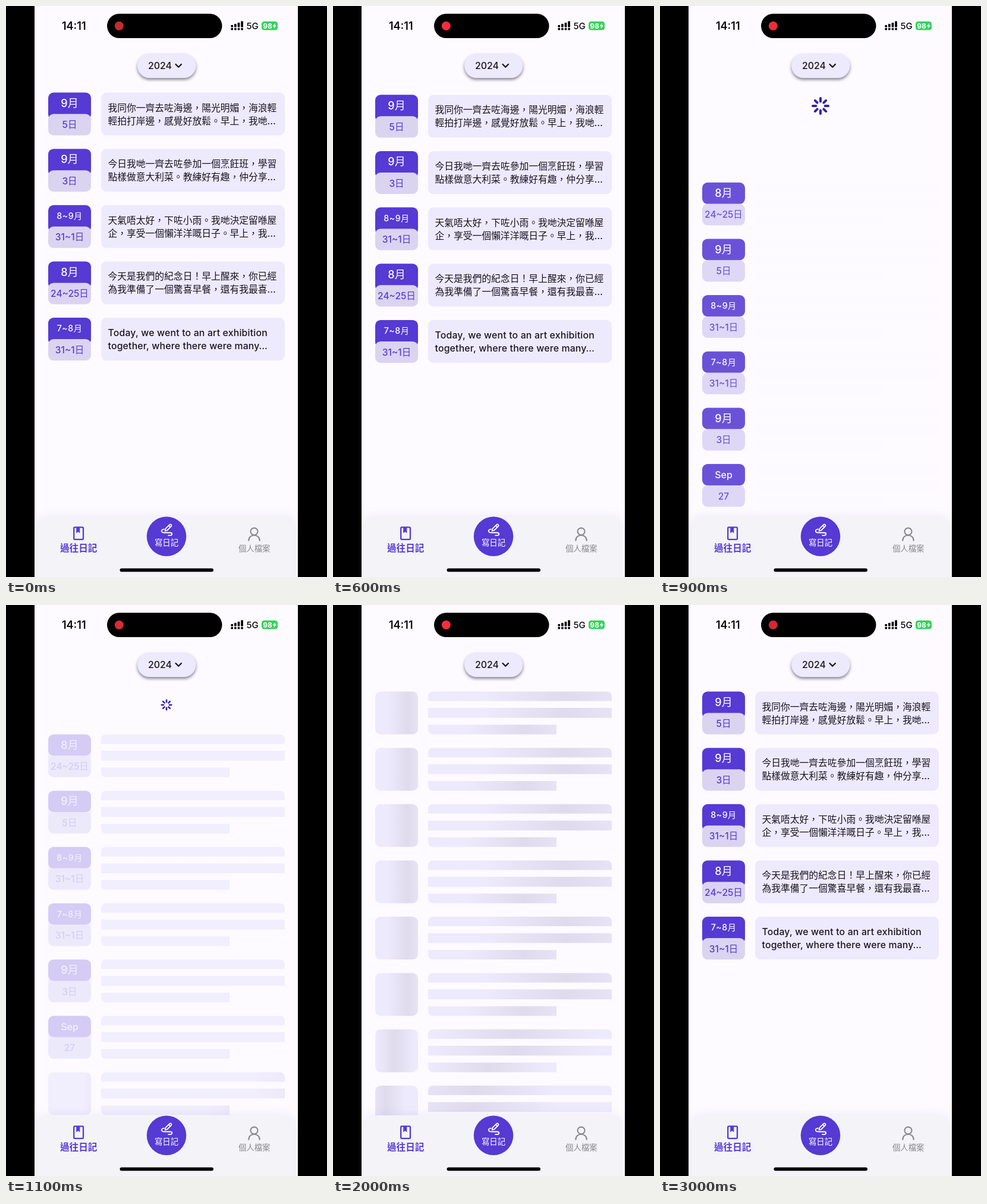
Animation, 540 px wide and 960 px high, one loop 3.1 s. Source, as an HTML page:

```html
<!DOCTYPE html>
<html lang="zh-HK">
<head>
<meta charset="utf-8">
<title>Diary list refresh</title>
<style>
html, body { margin: 0; width: 100%; height: 100%; overflow: hidden; background: #000; }
svg { display: block; width: 540px; height: 960px; }
text { font-family: Inter, "Noto Sans CJK HK", "Noto Sans CJK TC", "Noto Sans CJK JP", "Noto Sans CJK", sans-serif; font-weight: 500; }
.mid { text-anchor: middle; }
.line { fill: none; stroke-linecap: round; stroke-linejoin: round; }
#pill { filter: drop-shadow(0 3px 2.5px rgba(20, 15, 45, .5)); }
#bar { filter: drop-shadow(0 -3px 7px rgba(85, 58, 211, .07)); }
</style>
</head>
<body>
<svg viewBox="0 0 540 960">
  <defs>
    <clipPath id="screen"><rect x="48" width="443" height="960"/></clipPath>
    <g id="gradients"></g>
  </defs>
  <rect width="540" height="960"/>
  <g clip-path="url(#screen)">
    <rect x="48" width="443" height="960" fill="#fdfbff"/>
    <g id="diary"></g>
    <g id="loading">
      <g id="bones"></g>
      <g id="dates"></g>
    </g>
    <g id="spinner"></g>

    <rect id="pill" x="221" y="80" width="98.5" height="41" rx="20.5" fill="#eeeafd"/>
    <text x="239" y="106" font-size="15.8" fill="#17141f">2024</text>
    <path class="line" d="M285.5 98l4.7 4.7 4.7-4.7" stroke="#17141f" stroke-width="2.3"/>

    <text x="94" y="39.8" font-size="18" style="font-weight:600" fill="#08070a">14:11</text>
    <rect x="170" y="13" width="193.5" height="41" rx="20.5"/>
    <circle id="rec" cx="190.3" cy="33.5" r="7.5"/>
    <g id="signal"></g>
    <text x="404.5" y="39.2" font-size="15" fill="#08070a">5G</text>
    <rect x="430" y="26" width="27" height="14.6" rx="4.4" fill="#35d15c"/>
    <path d="M458.2 31q1.6 2.2 0 4.6z" fill="#9fc9a8"/>
    <text x="432.3" y="37.7" font-size="12" style="font-weight:700" fill="#fff">98</text>
    <path d="M453 28.8l-4.6 5.4h3l-1 4 4.8-5.6h-3z" fill="#fff"/>

    <path id="bar" d="M48 960V886q0-28 28-28H463q28 0 28 28V960z" fill="#f4f3f8"/>
    <g class="line" stroke="#553ad3" stroke-width="2.3">
      <rect x="114.2" y="876.4" width="15.8" height="20.4" rx="1.6"/>
      <path d="M118.8 877v8.6l2.5-2 2.5 2V877z" fill="#553ad3" stroke-width="1"/>
    </g>
    <text class="mid" x="122.2" y="917.3" font-size="15.6" style="font-weight:700" fill="#553ad3">過往日記</text>
    <circle cx="270" cy="891.8" r="33.3" fill="#553ad3"/>
    <g class="line" stroke="#fff" stroke-width="1.8">
      <path d="M267.6 882.6l.9-3.9 6.8-6.8q1.3-1 2.6.2t.2 2.6l-6.8 6.8zM273.8 873.6l2.7 2.7"/>
      <path d="M266 879.6q-4.6.6-4.3 3.2t5.3 2.7h9.3q3 .2 3 2.3t-3.2 2.4h-3"/>
    </g>
    <text class="mid" x="270" y="906.6" font-size="13.4" style="font-weight:400" fill="#fff">寫日記</text>
    <g class="line" stroke="#8b8990" stroke-width="2.1">
      <circle cx="417.5" cy="883.6" r="6"/>
      <path d="M408.3 898.8c0-12 18.4-12 18.4 0"/>
    </g>
    <text class="mid" x="417.7" y="917.2" font-size="13.4" style="font-weight:400" fill="#8b8990">個人檔案</text>
    <rect x="191.5" y="945.4" width="157.5" height="5.8" rx="2.9"/>
  </g>
</svg>
<script>
const LOOP = 3100, STEP = 100, SHIMMER = 1500;
const ROW_TOP = 145.5, ROW_PITCH = 94.65, TRIGGER = 112.7;
const PURPLE = '#553ad3', PALE = '#eeeafd';

const entries = [
  ['9月', '5日', '我同你一齊去咗海邊，陽光明媚，海浪輕', '輕拍打岸邊，感覺好放鬆。早上，我哋…'],
  ['9月', '3日', '今日我哋一齊去咗參加一個烹飪班，學習', '點樣做意大利菜。教練好有趣，仲分享…'],
  ['8~9月', '31~1日', '天氣唔太好，下咗小雨。我哋決定留喺屋', '企，享受一個懶洋洋嘅日子。早上，我…'],
  ['8月', '24~25日', '今天是我們的紀念日！早上醒來，你已經', '為我準備了一個驚喜早餐，還有我最喜…'],
  ['7~8月', '31~1日', 'Today, we went to an art exhibition', 'together, where there were many…']
];
const reloaded = [['8月', '24~25日'], ['9月', '5日'], ['8~9月', '31~1日'], ['7~8月', '31~1日'], ['9月', '3日'], ['Sep', '27']];

// Later rows are built later, so their shimmer lags behind (ms).
const lags = [0, 210, 375];

const pullKeys = [[500, 0], [600, 3.8], [700, 50], [800, 108], [900, 151.3], [1000, 138], [1100, 72], [1200, 18], [1300, 0]];
const dateKeys = [[800, 1], [900, .87], [1000, .5], [1100, .18], [1200, 0]];
const boneKeys = [[900, .04], [1000, .4], [1100, .75], [1200, 1]];

const $ = id => document.getElementById(id);
const lerp = (a, b, k) => a + (b - a) * k;

function keyed(keys, t) {
  if (t <= keys[0][0]) return keys[0][1];
  for (let i = 1; i < keys.length; i++) {
    const [t0, v0] = keys[i - 1], [t1, v1] = keys[i];
    if (t <= t1) return lerp(v0, v1, (t - t0) / (t1 - t0));
  }
  return keys[keys.length - 1][1];
}

const row = (i, body) => `<g transform="translate(0 ${ROW_TOP + i * ROW_PITCH})">${body}</g>`;
const box = (x, y, w, h, fill) => `<rect x="${x}" y="${y}" width="${w}" height="${h}" rx="9" fill="${fill}"/>`;

function dateTile(month, day, topHeight, dayFill) {
  const range = month.includes('~');
  const size = range ? 14.2 : month === 'Sep' ? 16 : 18;
  return box(71, 0, 72, topHeight, PURPLE) + box(71, 36, 72, 36, dayFill) +
    `<text class="mid" x="107" y="${range ? 23.2 : 24.3}" font-size="${size}" letter-spacing="${range ? .5 : 0}" fill="#fff">${month}</text>` +
    `<text class="mid" x="107" y="59.7" font-size="15.5" fill="${PURPLE}">${day}</text>`;
}

function card(a, b) {
  const latin = /^[A-Z]/.test(a) ? .2 : 0;
  const line = (s, y) => `<text x="171.5" y="${y}" font-size="15.78" letter-spacing="${latin}" fill="#17141f">${s}</text>`;
  return box(160, 0, 309, 72, PALE) + line(a, 31) + line(b, 53);
}

function bone(i) {
  const fill = `url(#sheen${Math.max(0, i - 5)})`;
  const bar = d => `<path d="${d}" fill="${fill}"/>`;
  return box(71, 0, 72, 72, fill) +
    bar('M160 16V9q0-9 9-9H460q9 0 9 9V16z') +
    bar('M160 27.6H469V44.2H160z') +
    bar('M160 55.8H376V72H169q-9 0-9-9z');
}

$('diary').innerHTML = entries.map(([m, d, a, b], i) => row(i, dateTile(m, d, 46, '#dad4f1') + card(a, b))).join('');
$('dates').innerHTML = reloaded.map(([m, d], i) => row(i, dateTile(m, d, 36, '#dad3f5'))).join('');
$('bones').innerHTML = Array.from({ length: 8 }, (_, i) => row(i, bone(i))).join('');
$('gradients').innerHTML = lags.map((_, i) =>
  `<linearGradient id="sheen${i}"><stop offset="0" stop-color="${PALE}"/><stop offset=".5" stop-color="#dfdbed"/><stop offset="1" stop-color="${PALE}"/></linearGradient>`).join('');
$('spinner').innerHTML = Array.from({ length: 8 }, (_, i) =>
  `<path class="line" d="M0-7.6V-13" stroke="#3420ae" stroke-width="4" transform="rotate(${i * 45})"/>`).join('');
$('signal').innerHTML = [32, 30, 28, 25.6].map((y, i) => {
  const x = 378.4 + i * 5.6;
  return `<rect x="${x}" y="${y}" width="3.7" height="${35.8 - y}" rx="1"/><rect x="${x}" y="37" width="3.7" height="3.6" rx="1"/>`;
}).join('');

const ticks = [...$('spinner').children];
const sheens = lags.map((_, i) => $('sheen' + i));

function render(t) {
  const pull = keyed(pullKeys, t);
  const loading = t >= 900 && t < 2900;
  const shift = `translate(0 ${pull})`;

  $('diary').setAttribute('display', loading ? 'none' : 'inline');
  $('loading').setAttribute('display', loading ? 'inline' : 'none');
  $('diary').setAttribute('transform', shift);
  $('loading').setAttribute('transform', shift);
  $('dates').setAttribute('opacity', keyed(dateKeys, t));
  $('bones').setAttribute('opacity', keyed(boneKeys, t));

  // The spinner gains ticks while pulling and shrinks away on release.
  const reach = Math.min(1, pull / TRIGGER);
  const scale = t > 900 ? reach : 1;
  $('spinner').setAttribute('transform', `translate(270 168) scale(${scale})`);
  $('spinner').setAttribute('opacity', Math.min(1, reach / .35));
  ticks.forEach((tick, i) => tick.setAttribute('opacity', t > 900 || i < Math.round(reach * 8) ? 1 : 0));

  sheens.forEach((g, i) => {
    const p = ((t - 1062 - lags[i] + 2 * SHIMMER) % SHIMMER) / SHIMMER;
    const c = lerp(-.5, 1.5, p);
    g.setAttribute('x1', c - .45);
    g.setAttribute('x2', c + .45);
  });

  const glow = (1 - Math.cos(t / 1400 * 2 * Math.PI)) / 2;
  const rgb = [lerp(196, 243, glow), lerp(43, 48, glow), lerp(48, 58, glow)].map(Math.round);
  $('rec').setAttribute('fill', `rgb(${rgb})`);
}

const start = performance.now();
function tick() {
  const t = Math.max(0, performance.now() - start) % LOOP;
  render(Math.floor(t / STEP) * STEP);
  requestAnimationFrame(tick);
}
tick();
</script>
</body>
</html>
```
